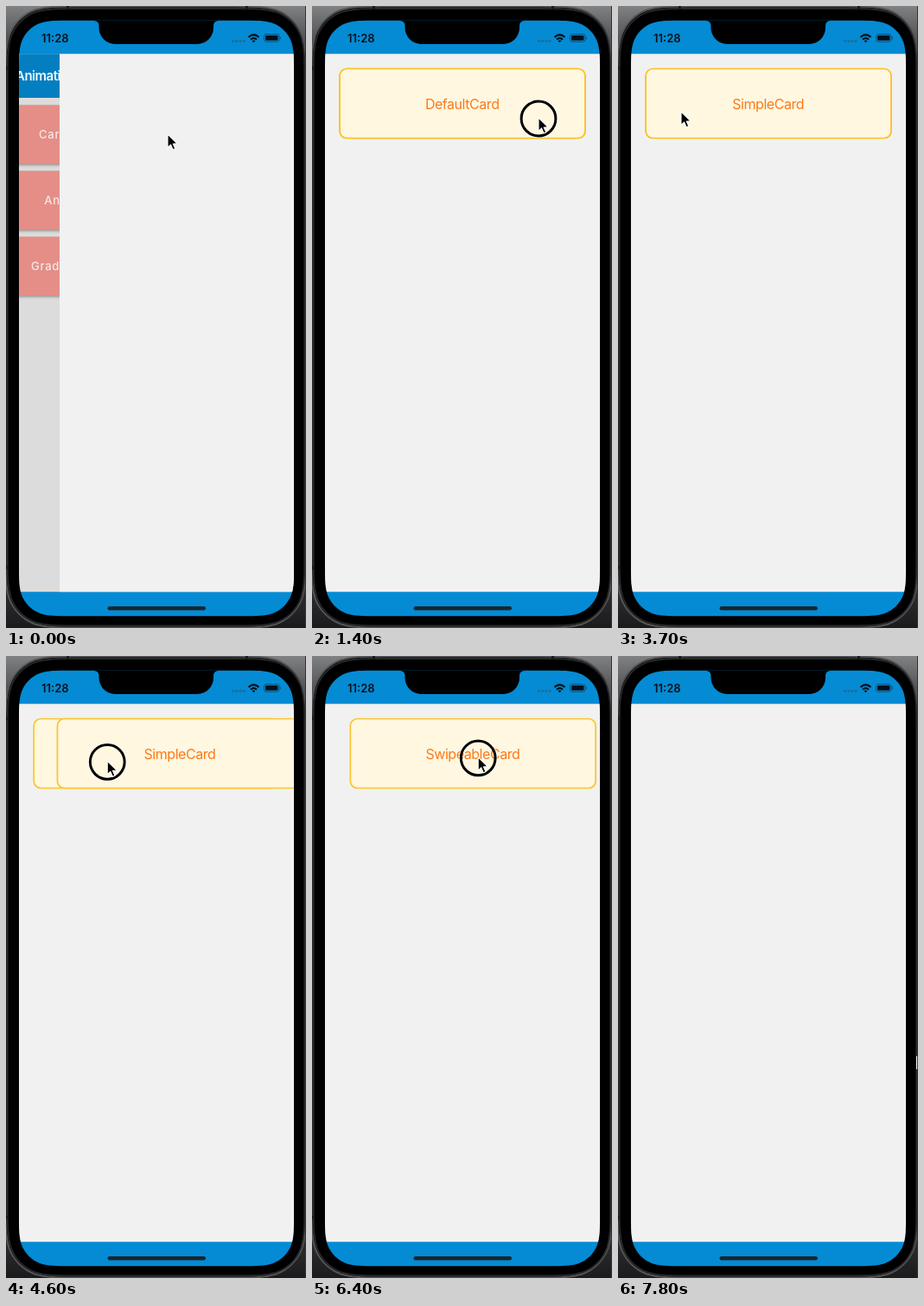
An HTML page for the animation above (7900 ms loop, 347 px wide and 718 px high).

```html
<!DOCTYPE html>
<html lang="en">
<head>
<meta charset="utf-8">
<title>Swipe cards</title>
<style>
  html, body { margin: 0; width: 100%; height: 100%; overflow: hidden; background: #000; }
  svg { display: block; width: 347px; height: 718px; font-family: Inter, "Liberation Sans", sans-serif; }
  .card rect { fill: #fff7e0; stroke: #fac42f; stroke-width: 1.7; }
  .card text { fill: #fb7a18; font-size: 16px; letter-spacing: -.45px; text-anchor: middle; }
  .menu rect { fill: #e58e87; }
  .menu .shade { fill: #555; fill-opacity: .5; }
  .menu text { fill: #f3e9e8; font-size: 13px; font-weight: 500; letter-spacing: .75px; }
  .menu .title { fill: #f4f8fb; font-size: 15px; font-weight: 600; letter-spacing: -.5px; }
</style>
</head>
<body>
<svg viewBox="0 0 347 718">
  <defs>
    <linearGradient id="back" x2="0" y2="1">
      <stop offset="0" stop-color="#808183"/>
      <stop offset=".06" stop-color="#4c4d4f"/>
      <stop offset=".9" stop-color="#3a3a3c"/>
      <stop offset="1" stop-color="#1b1b1e"/>
    </linearGradient>
    <clipPath id="screen"><path id="glass"/></clipPath>
    <clipPath id="body"><rect x="15" y="55.200" width="318" height="621"/></clipPath>
    <filter id="soft" x="-10%" y="-20%" width="120%" height="150%"><feGaussianBlur stdDeviation="1.800"/></filter>
  </defs>

  <rect width="347" height="718" fill="url(#back)"/>
  <path id="shell" stroke="#555658" stroke-width="2"/>
  <path id="bezel" stroke="#28292b" stroke-width="1.800"/>
  <path d="M0 72h3M0 648h3M70 2h3M277 2h3" stroke="#1b1c1d" stroke-width="4"/>

  <g clip-path="url(#screen)">
    <rect x="15" y="16" width="318" height="689" fill="#048bd4"/>
    <g clip-path="url(#body)">
      <g id="menu" class="menu">
        <path d="M-90 55H400V677H-90Z" fill="#dcdcdc"/>
        <path d="M-90 55H400V106H-90Z" fill="#037fc1"/>
        <text class="title" x="11" y="86">Animation Examples</text>
      </g>
      <g id="page">
        <rect x="15" y="55" width="318" height="622" fill="#f1f1f1"/>
        <g id="deck"></g>
      </g>
    </g>
    <path d="M102 16V17A5.500 5.500 0 0 1 107.500 22.500V25A19 19 0 0 0 126.500 44H221A19 19 0 0 0 240 25V22.500A5.500 5.500 0 0 1 245.500 17V16Z"/>
    <text x="41" y="42" font-size="13" font-weight="600" fill="#06121b">11:28</text>
    <g fill="#1b6d9f">
      <rect x="261" y="39" width="3" height="3" rx="1"/><rect x="265.200" y="39" width="3" height="3" rx="1"/>
      <rect x="269.400" y="39" width="3" height="3" rx="1"/><rect x="273.600" y="39" width="3" height="3" rx="1"/>
    </g>
    <g fill="none" stroke="#06121b" stroke-width="2.200">
      <path d="M280.500 36Q286.500 30.500 292.500 36"/>
      <path d="M283 38.800Q286.500 35.600 290 38.800"/>
    </g>
    <path d="M284.600 40.200Q286.500 38.700 288.400 40.200L286.500 42.200Z" fill="#06121b"/>
    <rect x="298.500" y="32.500" width="17.500" height="8.800" rx="2.600" fill="none" stroke="#07517c"/>
    <rect x="300" y="34" width="14.500" height="5.800" rx="1.400" fill="#03101a"/>
    <path d="M317.200 35.400v3" stroke="#07517c"/>
    <rect x="117.500" y="693" width="113.500" height="4.400" rx="2.200" fill="#18262f"/>
  </g>

  <g id="pointer">
    <g id="ring" fill="none">
      <circle cy="1" r="21.800" stroke="#fff" stroke-width="1.200" stroke-opacity=".7"/>
      <circle cy="1" r="19.900" stroke="#000" stroke-width="3"/>
    </g>
    <path transform="scale(1.08)" d="M0 0V14.200L3.300 11.200L5.600 16.500L8.100 15.400L5.800 10.300L10.200 10Z" stroke="#fff"/>
  </g>
  <rect x="346" width="1" height="718" fill="#0a5208"/>
  <rect id="edge" x="345" y="462" width="1" height="15" fill="#fff"/>
</svg>

<script>
const LOOP = 7900, STEP = 100;
const $ = id => document.getElementById(id);

// time, x, y of the pointer tip
const PATH = [
  [0, 187, 148], [300, 205, 156], [700, 250, 138], [900, 250, 138],
  [1200, 262, 129], [1400, 262, 129], [1800, 172, 130], [2200, 147, 129],
  [2600, 205, 130], [3000, 95, 126], [3400, 73, 122], [3700, 73, 122],
  [3900, 90, 124], [4300, 195, 122], [4800, 75, 121], [5500, 209, 120],
  [5700, 262, 119], [6000, 215, 118], [6300, 180, 117], [6700, 258, 116],
  [7100, 220, 115], [7300, 290, 130], [7500, 365, 465]
];
// grab is the pointer x at which the card rests
const CARDS = [
  { name: 'DefaultCard', down: 1400, up: 3000, grab: 259, exit: -330 },
  { name: 'SimpleCard', down: 3900, up: 5700, grab: 90, exit: 330 },
  { name: 'SwipeableCard', down: 6300, up: 7300, grab: 180, exit: 330 }
];
const MENU = [['Card Swiper', 38, 114], ['Animations', 44.3, 190], ['Gradient Button', 29, 266]];
const SLIDE = [47, 22, 10, 4, 1];
const FLIGHT = 300;

const mix = (a, b, k) => a + (b - a) * k;
const smooth = k => k * k * (3 - 2 * k);
const show = (el, on) => el.setAttribute('visibility', on ? 'visible' : 'hidden');
const move = (el, x, y = 0) => el.setAttribute('transform', `translate(${x} ${y})`);

// Rectangle with continuous-curvature corners
function squircle(left, top, right, bottom, r) {
  const curve = [[1.529, 0], [1.088, 0], [.868, 0], [.631, .075], [.373, .169],
    [.169, .373], [.075, .631], [0, .868], [0, 1.088], [0, 1.529]];
  const corner = (x, y, sx, sy, flip) => {
    const p = curve.map(([u, v]) => `${x + sx * u * r} ${y + sy * v * r}`);
    if (flip) p.reverse();
    return `${p[0]}C${p.slice(1).join(' ')}`;
  };
  return 'M' + [
    corner(left, top, 1, 1, true), corner(right, top, -1, 1, false),
    corner(right, bottom, -1, -1, true), corner(left, bottom, 1, -1, false)
  ].join('L') + 'Z';
}
$('glass').setAttribute('d', squircle(15, 16.7, 333, 704.2, 39));
$('bezel').setAttribute('d', squircle(1.7, 3, 345.3, 715.5, 52));
$('shell').setAttribute('d', squircle(-.5, .5, 346.5, 717.5, 54));

MENU.forEach(([label, x, y]) => $('menu').insertAdjacentHTML('beforeend',
  `<rect class="shade" x="-60" y="${y + 2}" width="306" height="68" filter="url(#soft)"/>
   <rect x="-60" y="${y + .3}" width="306" height="68"/>
   <text x="${x}" y="${y + 39}">${label}</text>`));

CARDS.slice().reverse().forEach(card => {
  $('deck').insertAdjacentHTML('beforeend',
    `<g class="card"><rect x="32.200" y="72.500" width="283.700" height="80" rx="8"/>
     <text x="173.700" y="118.500">${card.name}</text></g>`);
  card.el = $('deck').lastElementChild;
});

function pointerAt(t) {
  const i = PATH.findIndex(p => p[0] > t);
  if (i < 0) return PATH[PATH.length - 1].slice(1);
  const a = PATH[i - 1], b = PATH[i];
  const k = smooth((t - a[0]) / (b[0] - a[0]));
  return [mix(a[1], b[1], k), mix(a[2], b[2], k)];
}

function offsetAt(card, t) {
  if (t <= card.down) return 0;
  const x = pointerAt(Math.min(t, card.up))[0] - card.grab;
  return t <= card.up ? x : mix(x, card.exit, Math.min(1, (t - card.up) / FLIGHT));
}

function draw(t) {
  const shift = SLIDE[t / STEP] || 0;
  move($('page'), shift);
  move($('menu'), (shift - SLIDE[0]) * .3);
  show($('menu'), shift > 0);
  show($('deck'), t >= 200);

  for (const card of CARDS) {
    move(card.el, offsetAt(card, t));
    card.el.style.display = t >= card.up + FLIGHT ? 'none' : '';
  }
  const [x, y] = pointerAt(t);
  move($('pointer'), x, y);
  $('pointer').style.display = t < 7500 ? '' : 'none';
  show($('ring'), CARDS.some(c => t >= c.down && t < c.up));
  show($('edge'), t >= 7800);
}

const start = performance.now();
function tick() {
  const t = (performance.now() - start) % LOOP;
  draw(Math.floor(t / STEP) * STEP);
  requestAnimationFrame(tick);
}
draw(0);
requestAnimationFrame(tick);
</script>
</body>
</html>
```
